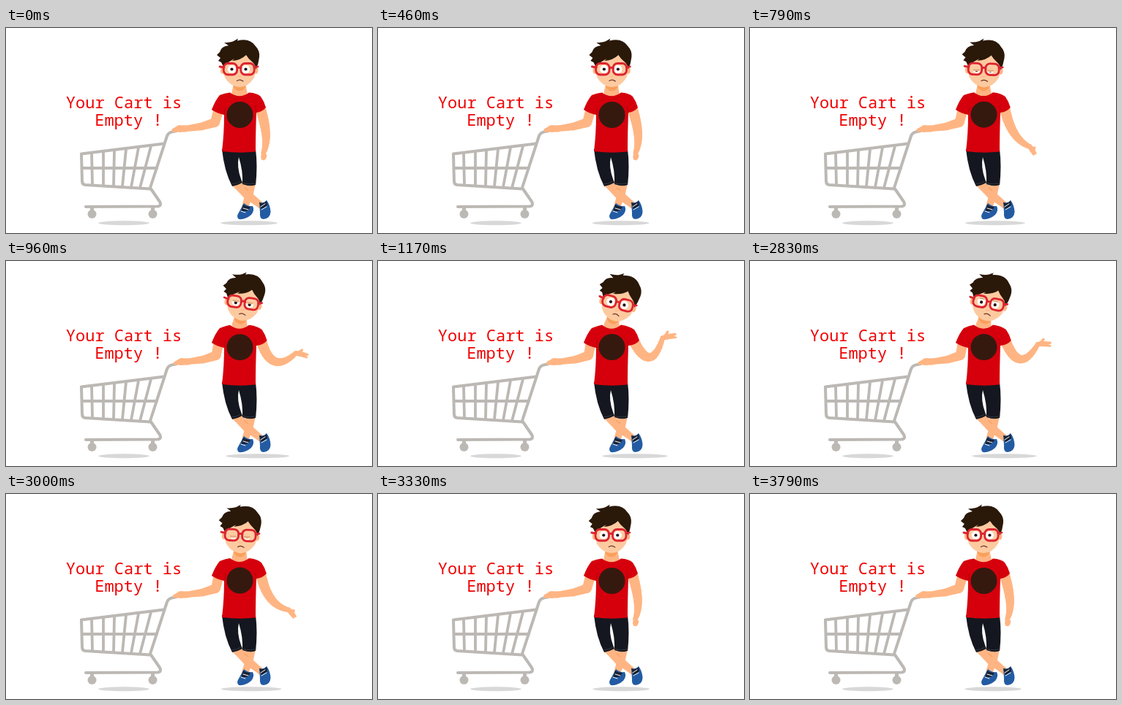
Write an HTML page with a canvas that moves like this. It is 500x281 px and loops after 3.83 s.

```html
<!DOCTYPE html>
<html lang="en">
<head>
<meta charset="utf-8">
<title>Your cart is empty</title>
<style>
  html, body { margin: 0; width: 100%; height: 100%; overflow: hidden; background: #fff; }
  canvas { display: block; width: 100vw; height: 100vh; }
</style>
</head>
<body>
<canvas id="stage" width="500" height="281"></canvas>
<script>
const ctx = document.getElementById('stage').getContext('2d');
const LOOP = 3830, STEP = 1000 / 24;
const SKIN = '#ffb583', FACE = '#fdcaa0', SHADE = '#f9a05c', HAIR = '#2a1809', RED = '#d6000d';
const FRAME = '#dc2430', NAVY = '#14171f', BLUE = '#235ba3', GREY = '#bcb8b4', SHADOW = '#d8d8d8';

const clamp = v => Math.max(0, Math.min(1, v));
const mix = (a, b, k) => a + (b - a) * k;
const ease = v => (1 - Math.cos(Math.PI * clamp(v))) / 2;
const rad = d => d * Math.PI / 180;

function fill(d, color) {
  ctx.fillStyle = color;
  ctx.fill(new Path2D(d));
}

function stroke(d, color, width) {
  ctx.strokeStyle = color;
  ctx.lineWidth = width;
  ctx.stroke(new Path2D(d));
}

function oval(x, y, rx, ry, color) {
  ctx.fillStyle = color;
  ctx.beginPath();
  ctx.ellipse(x, y, rx, ry, 0, 0, 7);
  ctx.fill();
}

// Tapered limb through joints given as [x, y, radius]
function limb(joints, color = SKIN) {
  joints.forEach(([x, y, r], i) => {
    oval(x, y, r, r, color);
    if (!i) return;
    const [px, py, pr] = joints[i - 1];
    const len = Math.hypot(x - px, y - py);
    const nx = (py - y) / len, ny = (x - px) / len;
    ctx.beginPath();
    ctx.moveTo(px + nx * pr, py + ny * pr);
    ctx.lineTo(x + nx * r, y + ny * r);
    ctx.lineTo(x - nx * r, y - ny * r);
    ctx.lineTo(px - nx * pr, py - ny * pr);
    ctx.fill();
  });
}

// Smooth joints from a to c, passing through b halfway
function bow(a, b, c, steps = 14) {
  return Array.from({ length: steps + 1 }, (_, i) => {
    const k = i / steps;
    return a.map((v, n) => {
      const ctrl = 2 * b[n] - (v + c[n]) / 2;
      return mix(mix(v, ctrl, k), mix(ctrl, c[n], k), k);
    });
  });
}

function drawText() {
  ctx.font = '22px "Noto Sans Mono", "Liberation Mono", monospace';
  ctx.fillStyle = '#f00000';
  ctx.fillText('Your Cart is', 81.8, 110);
  ctx.fillText('Empty !', 121.2, 134);
}

function drawCart() {
  oval(161, 267.3, 35, 3, SHADOW);
  stroke('M103 172.500 L216 158.500 M104 192 H206', GREY, 4);
  stroke('M117 172 L118 214 M133 170 L133 215 M148 168 L147 216 M164 166 L159 217 M181 164 L171 218 M198 162 L183 219', GREY, 3.8);
  stroke('M103 173 L104 210 Q104 214.500 108 215 L197 220.500', GREY, 4);
  stroke('M232 141.500 Q222 142 220 148 L197 219 L210 238 Q213 244 207 244.500 L109 245', GREY, 4);
  for (const x of [117.5, 200.5]) {
    stroke(`M${x} 246 V253`, GREY, 5);
    oval(x, 255, 6, 6, GREY);
  }
}

function drawLegs() {
  limb([[315, 212, 7], [329, 228, 6], [348, 243, 4.5]]);
  limb([[335, 210, 6.5], [332, 229, 5.5], [327, 244, 4.5]]);
  stroke('M326 219 L331 223', SHADE, 1.2);
  fill('M346 239 Q352 241 356 236 Q361 243 361.500 252 Q361 261 352 262 Q346 262 347 253 Z', BLUE);
  fill('M325 240 Q330 245 337 244 Q340 250 335 256 Q327 263 318 262 Q314 259 318 253 Z', BLUE);
  fill('M346 239 Q352 242 356 237 L357 243 L349 249 Z M324 242 Q328 245 334 245 L331 250 L321 252 Z', '#1b2333');
  stroke('M348 245 L354 241 M349 249 L356 245 M324 247 L331 249 M321 251 L327 253', '#fff', 1);
  fill(`M295 166 H341 Q344 190 341 215 Q333 218 323 214 Q324 196 318 177
    Q315 190 321 207 L323 212 Q316 216 309 217 Q298 196 295 166 Z`, NAVY);
  stroke('M308 214 Q315 214 321 210 M324 212.500 Q333 215.500 341 212.500', '#343740', 1);
}

function drawLeftArm(p, sway) {
  const dx = 3.5 * p + sway * 0.5;
  limb([[291, 110, 7], [285.5 + dx * 0.6, 129.5, 6.5], [267 + dx, 135, 5.2], [245 + dx, 138, 4]]);
  limb([[246 + dx, 138, 4.4], [237 + dx, 138, 4.8], [229 + dx, 140, 2.6]]);
}

function drawRightArm(p, sway) {
  const elbow = [mix(355, 371, p) + sway * 0.4, 145 + 3 * p - 16 * p * p, 5.8];
  const bend = rad(mix(-7, 146, p)), palm = rad(mix(-6, 98, p));
  const len = mix(26, 32, p);
  const wx = elbow[0] + Math.sin(bend) * len, wy = elbow[1] + Math.cos(bend) * len;
  const reach = (angle, d) => [wx + Math.sin(palm + angle) * d, wy + Math.cos(palm + angle) * d];
  limb(bow([mix(347, 349, p), 109, 7.2], elbow, [wx, wy, 3.2]));
  limb([[wx, wy, 3.2], [...reach(0.15, 6), 3.6], [...reach(0.15, mix(9, 18, p)), 1.6]]);
  limb([[...reach(0, 6), 2.8], [...reach(-0.1, mix(9, 18, p)), 1.3]]);
  limb([[...reach(0, 2), 2.2], [...reach(0.75, mix(5, 11, p)), 1.6]]);
}

function drawShirt(p) {
  const lift = -p, out = 2 * p;
  fill(`M306 ${88.5 + lift} Q319 98 332 ${88.5 + lift}
    Q343 89 ${348 + out} 94 Q${353 + out} 101 ${355 + out} 109
    Q${350 + out} 115 342 116 Q341 145 341 169.500 Q319 172 295 169
    Q298 145 298 119 Q288 117 281 112 Q286 99 292 92 Q299 89 306 ${88.5 + lift} Z`, RED);
  stroke('M298 118 L300 109 M342 115 L340 107', '#b3000b', 0.9);
  oval(319.5, 119 + lift, 18, 18, '#35190f');
}

function drawEye(x, shut) {
  const y = 56.5;
  ctx.save();
  ctx.beginPath();
  ctx.arc(x, y, 5.7, 0, 7);
  ctx.clip();
  oval(x, y, 6, 6, '#fff');
  oval(x, y + shut * 2, 2.1, 2.1, '#24130f');
  ctx.fillStyle = FACE;
  ctx.fillRect(x - 7, y - 7, 14, shut * 11);
  if (shut > 0.1) stroke(`M${x - 4} ${y - 7 + shut * 9} h8`, '#b9805c', 0.8);
  ctx.restore();
}

function drawLens(x) {
  ctx.strokeStyle = FRAME;
  ctx.lineWidth = 2.8;
  ctx.beginPath();
  ctx.roundRect(x - 9.2, 48.5, 18.4, 15.5, 6);
  ctx.stroke();
}

function drawHead(p, sway) {
  const tilt = p * p, shut = Math.sin(Math.PI * p);
  ctx.save();
  ctx.translate(319 + 2.5 * tilt + sway, 84 + tilt);
  ctx.rotate(rad(14 * tilt));
  ctx.translate(-319, -84);

  oval(341.5, 58, 3, 5, SKIN);
  oval(296, 58, 3, 5, SKIN);
  fill('M297 40 Q318 26 341 40 Q343 58 339 68 Q331 81 319 81 Q306 80 299 68 Q295 56 297 40 Z', FACE);
  fill(`M298 55 L294 47 L290 45 L293 41 L288 37 L292 33 Q294 25 304 24 L298 20
    Q306 20 311 18 L317 14.500 L316 17.500 Q333 13 341 25 Q347 31 346 40
    Q345 49 341.500 57 Q341 50 336 46 Q331 42 328 37 Q321 44 309 45 L312 42
    Q303 47 300 50 Z`, HAIR);

  drawEye(308.5, shut);
  drawEye(327.5, shut);
  drawLens(306.5);
  drawLens(330);
  stroke('M316 55 Q318 53.500 321 55 M292 53 L298 54 M339 54 L344 53', FRAME, 2.8);
  stroke('M317 66 Q319 67.500 321 66', SKIN, 1.2);
  stroke('M315.500 72.500 Q319.500 69.500 324 73', '#713326', 1.2);
  ctx.restore();
}

function render(time) {
  const t = Math.floor((time % LOOP) / STEP + 0.05) * STEP;
  const p = t < 1900 ? ease((t - 540) / 610) : 1 - ease((t - 2670) / 600);
  const sway = (1 - p) * 0.5 * Math.sin(t / LOOP * 6 * Math.PI);
  const headX = 319 + 2.5 * p * p + sway;

  ctx.fillStyle = '#fff';
  ctx.fillRect(0, 0, 500, 281);
  ctx.lineCap = ctx.lineJoin = 'round';
  drawText();
  drawCart();
  oval(332 + 19 * p * p - sway, 267.3, 39 + 6 * p, 3, SHADOW);
  drawLeftArm(p, sway);
  drawLegs();
  drawRightArm(p, sway);
  limb([[319, 89, 10.5], [headX, 78, 8.5]]);
  limb([[headX, 78, 8.5], [headX, 76, 8.5]], SHADE);
  drawShirt(p);
  drawHead(p, sway);
}

const start = performance.now();
function tick() {
  render(performance.now() - start);
  requestAnimationFrame(tick);
}
tick();
</script>
</body>
</html>
```
